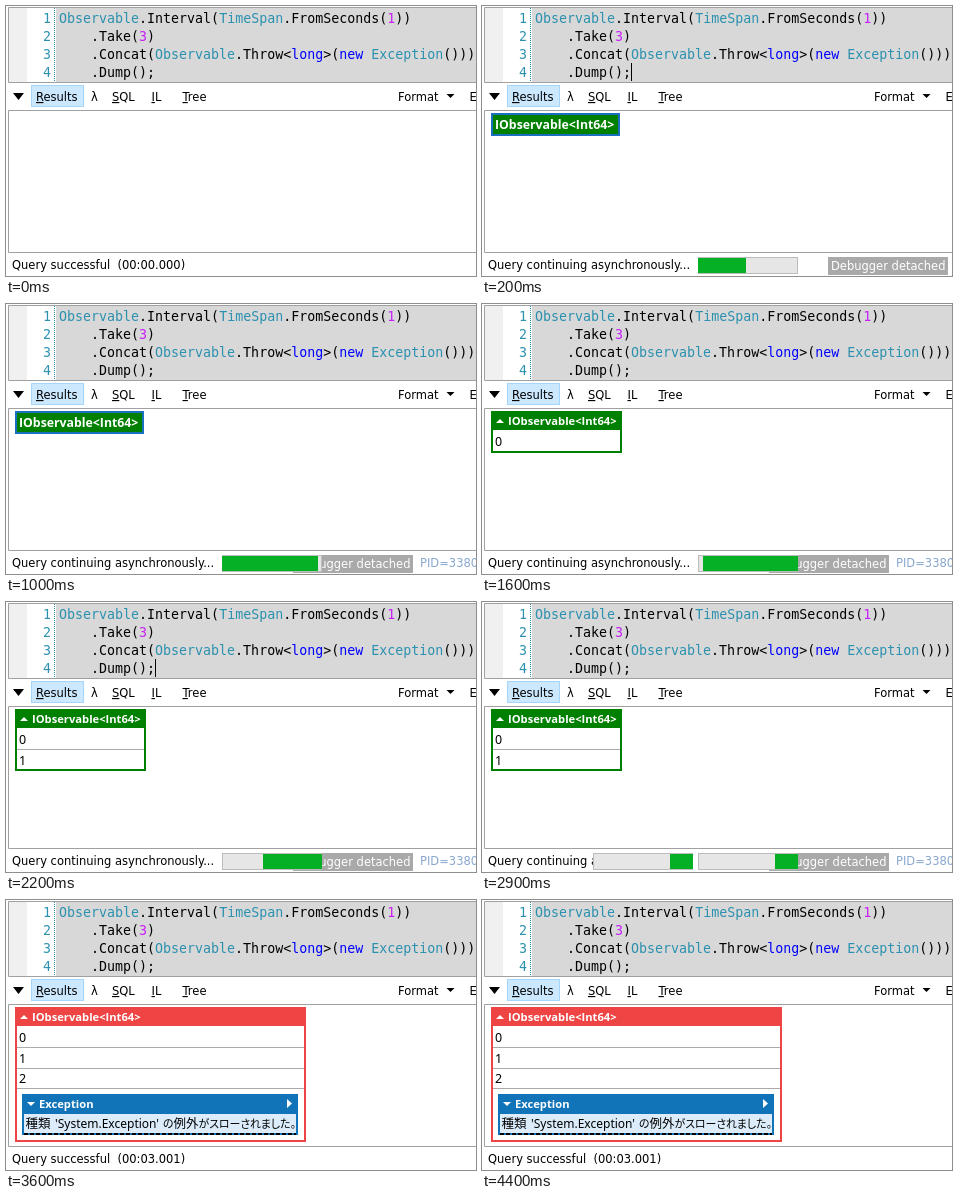
These frames come from a looping animation (470 px wide and 270 px high, 4.6 s). An HTML page:

```html
<!DOCTYPE html>
<html>
<head>
<meta charset="utf-8">
<style>
html, body { margin: 0; width: 100%; height: 100%; overflow: hidden; background: #fff; }
svg { display: block; }
text { font: 11.5px "DejaVu Sans", sans-serif; white-space: pre; }
.code text { font: 13.3px "DejaVu Sans Mono", monospace; }
.type { fill: #2b91af; }
.num { fill: #c81efa; }
.key { fill: #00f; }
.u { text-decoration: underline; }
.head { font: bold 11.2px "Open Sans", sans-serif; fill: #fff; }
.big { font-size: 12.3px; }
.cell { font: 12.5px "Noto Sans", sans-serif; }
.msg { font: 12px "Noto Sans", sans-serif; }
.ja { font: 12.5px "Noto Sans CJK JP", "Noto Sans CJK", sans-serif; font-feature-settings: "palt"; }
.kana { font-size: 10.9px; }
.rule { stroke: #aaa; }
.hide { display: none; }
</style>
</head>
<body>
<svg width="470" height="270" viewBox="0 0 470 270">
  <!-- editor -->
  <path fill="#f0f0f0" d="M3 2h18v74H3z"/>
  <path fill="#d8d8d8" d="M50 2h420v74H50z"/>
  <path fill="none" stroke="#a0a0a0" d="M470 1.5H2.5V76.5H470"/>
  <path stroke="#2b91af" stroke-dasharray="1 1" d="M48.5 2V76"/>
  <g class="code">
    <g class="type">
      <text x="37" y="17">1</text><text x="37" y="35">2</text>
      <text x="37" y="53">3</text><text x="37" y="71">4</text>
    </g>
    <text x="53" y="17"><tspan class="type">Observable</tspan>.Interval(<tspan class="type">TimeSpan</tspan>.FromSeconds(<tspan class="num">1</tspan>))</text>
    <text x="85" y="35">.Take(<tspan class="num">3</tspan>)</text>
    <text x="85" y="53">.Concat(<tspan class="type">Observable</tspan>.Throw&lt;<tspan class="key">long</tspan>&gt;(<tspan class="key">new</tspan> <tspan class="type">Exception</tspan>()))</text>
    <text x="85" y="71">.Dump();</text>
  </g>
  <path id="caret" d="M149 57h1v18h-1z"/>

  <!-- toolbar -->
  <path d="M7 87h11l-5.5 7z"/>
  <rect x="25.5" y="79.5" width="52" height="21" fill="#cce8ff" stroke="#a5d5fb"/>
  <text x="30" y="95"><tspan class="u">R</tspan>esults</text>
  <text x="85" y="95">λ</text>
  <text x="106" y="95"><tspan class="u">S</tspan>QL</text>
  <text x="145.5" y="95"><tspan class="u">I</tspan>L</text>
  <text x="176.5" y="95"><tspan class="u">T</tspan>ree</text>
  <text x="392" y="95">Format</text>
  <path d="M440.5 88h8l-4 4z"/>
  <text x="463.5" y="95">E</text>

  <!-- results -->
  <path fill="none" stroke="#a0a0a0" d="M470 104.5H2.5V246.5H470"/>
  <g id="empty">
    <rect x="10" y="108" width="127" height="21" fill="#008000" stroke="#1a6fbe" stroke-width="2"/>
    <text class="head big" x="13" y="123">IObservable&lt;Int64&gt;</text>
  </g>
  <g id="table">
    <rect id="frame" x="10" y="108" fill="#fff" stroke-width="2"/>
    <path id="bar"/>
    <path fill="#fff" d="M14 119h8l-4-4z"/>
    <text class="head" x="26" y="121">IObservable&lt;Int64&gt;</text>
    <text class="cell" x="13" y="142">0</text>
    <g id="row1"><path class="rule" d="M11 147.5H138"/><text class="cell" x="13" y="163">1</text></g>
    <g id="error">
      <path class="rule" d="M11 147.5H298M11 168.5H298M11 188.5H298"/>
      <text class="cell" x="13" y="183">2</text>
      <rect x="17" y="195" width="274" height="39" fill="#dcecfb" stroke="#1174b8" stroke-width="2"/>
      <path fill="#1174b8" d="M16 194h276v20H16z"/>
      <path fill="#fff" d="M21 202h8l-4 4zM281 199v9l5-4.5z"/>
      <text class="head" x="33" y="208">Exception</text>
      <text class="ja" x="19.5" y="228">種類</text>
      <text class="msg" x="49" y="228">'System.Exception'</text>
      <text class="ja" x="157" y="228"><tspan class="kana">の</tspan>例外<tspan class="kana">がスローされました。</tspan></text>
      <path stroke="#000" stroke-width="2" stroke-dasharray="4 2" d="M18 234H290"/>
    </g>
  </g>

  <!-- status bar -->
  <text id="status" x="6" y="263"></text>
  <g id="running">
    <g id="badge">
      <path fill="#a9a9a9" d="M0 251h120v18H0z"/>
      <text x="3" y="264" fill="#fff">Debugger detached</text>
    </g>
    <text id="pid" x="414" y="263" fill="#8aa8cf">PID=3380</text>
    <g id="meter" transform="translate(216)">
      <rect x=".5" y="251.5" width="99" height="16" fill="#e6e6e6" stroke="#bcbcbc"/>
      <rect id="fill" y="252" height="15" fill="#06b025"/>
    </g>
    <!-- second meter, over the end of the status text -->
    <use id="ghost" href="#meter" x="-105"/>
  </g>
</svg>
<script>
const $ = id => document.getElementById(id);
const show = (id, on) => $(id).classList.toggle('hide', !on);
const set = (id, attrs) => Object.entries(attrs).forEach(([k, v]) => $(id).setAttribute(k, v));

const LOOP = 4600, TICK = 100, START = 100, END = 3000;
const blinks = [100, 600, 1100, 1600, 2200, 2700, 3000, 3600, 4000, 4400];
const tail = [[1500, 0], [2100, 29], [2200, 41], [2700, 71], [2900, 77]];

// Piecewise linear value of a list of [time, value] points
function along(points, t) {
  let [t0, v0] = points[0];
  if (t <= t0) return v0;
  for (const [t1, v1] of points) {
    if (t < t1) return v0 + (v1 - v0) * (t - t0) / (t1 - t0);
    [t0, v0] = [t1, v1];
  }
  return v0;
}

function draw(t) {
  const running = t >= START && t < END, failed = t >= END;
  show('caret', blinks.filter(b => b <= t).length % 2);
  show('empty', running && t < 1100);
  show('table', t >= 1100);
  show('row1', t >= 2100);
  show('error', failed);
  show('running', running);
  show('pid', t >= 300);
  show('ghost', t >= 2900);

  const w = failed ? 291 : 131, h = failed ? 135 : t < 2100 ? 42 : 62;
  const color = failed ? '#ee4444' : '#008000';
  set('frame', { width: w - 2, height: h - 2, stroke: color });
  set('bar', { d: `M9 107h${w}v19H9z`, fill: color });

  $('status').textContent = running ? 'Query continuing asynchronously...'
    : `Query successful  (00:0${failed ? '3.001' : '0.000'})`;
  set('badge', { transform: `translate(${t < 300 ? 346 : 287})` });
  const left = Math.round(along(tail, t));
  const right = Math.min(100, 36 + t * 0.06);
  set('fill', { x: left, width: right - left });
}

function frame(now) {
  draw(Math.floor(now % LOOP / TICK) * TICK);
  requestAnimationFrame(frame);
}
draw(0);
requestAnimationFrame(frame);
</script>
</body>
</html>
```
